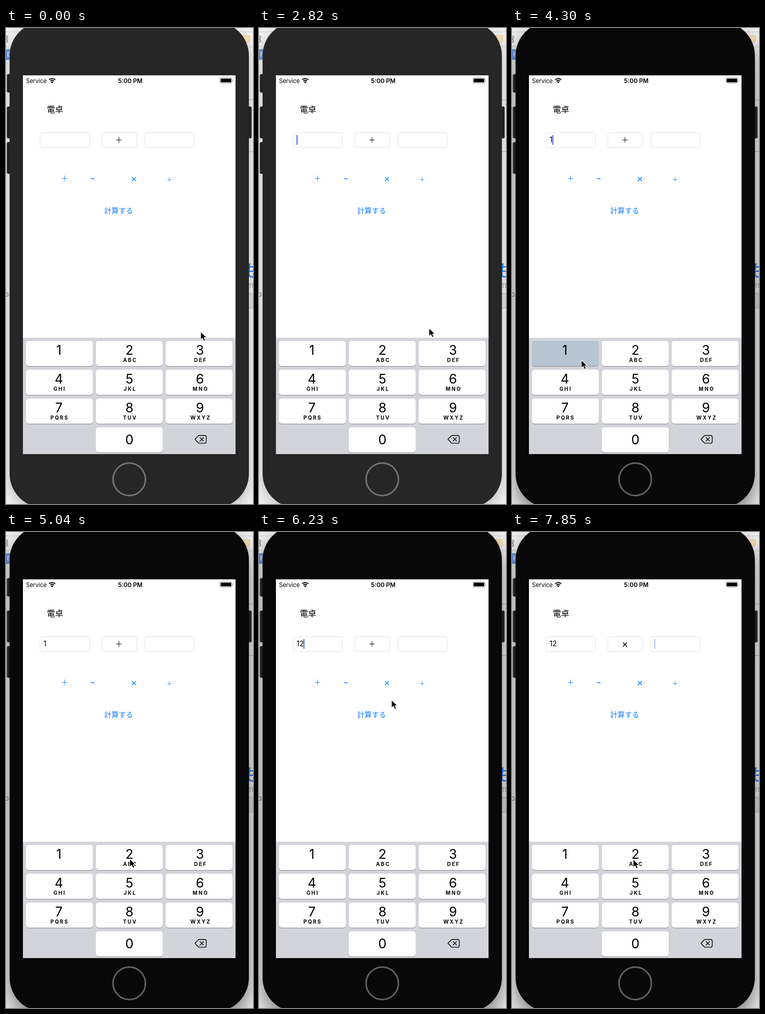
Write an HTML page that moves like this. It is 481 by 925 pixels and loops after 8 s.

```html
<!DOCTYPE html>
<html lang="ja">
<head>
<meta charset="utf-8">
<title>電卓</title>
<style>
  html, body { margin: 0; width: 100%; height: 100%; overflow: hidden; background: #f0f0f0; }
  svg { display: block; font-family: Inter, "Noto Sans CJK JP", "Noto Sans CJK", sans-serif; }
  .cjk { font-family: "Noto Sans CJK JP", "Noto Sans CJK", sans-serif; }
  .mid { text-anchor: middle; }
  .field { fill: #fff; stroke: #e6e6e6; }
  .blue { fill: #127eff; }
  .letters { font-size: 10px; font-weight: 700; letter-spacing: 2.1px; }
  .line { fill: none; stroke: #000; stroke-width: 1.4; stroke-linejoin: round; stroke-linecap: round; }

  #shadow { filter: blur(14px); opacity: .22; }
  .shell { fill: #262626; }
  .side { fill: #202020; stroke: #343434; }
  #home { fill: none; stroke: #747474; stroke-width: 3; }
  .active #shadow { filter: blur(20px); opacity: .5; transform: translateY(9px); }
  .active .shell { fill: #080808; }
  .active .side { fill: #1e1e1e; stroke: #3a3a3a; }
  .active #home { stroke: #626262; }
</style>
</head>
<body>
<svg id="stage" width="481" height="925" viewBox="0 0 481 925">
  <!-- window behind the phone -->
  <rect width="481" height="925" fill="#f0f0f0"/>
  <rect y="7" width="481" height="1" fill="#c9c9c9"/>
  <rect y="36" width="481" height="1" fill="#cfcfcf"/>
  <path d="M-3 16h6v4h-6zM-3 23h6v4h-6zM0 20v3" fill="none" stroke="#808080" stroke-width="1.3"/>
  <rect x="461" y="15" width="13" height="12" rx="2" fill="#f8e3b8" stroke="#efc36c"/>
  <rect y="41" width="20" height="21" fill="#6d9ae0"/>
  <text x="2" y="55" font-size="11" fill="#fff">E</text>
  <text x="-3" y="522" font-size="14" fill="#777">p</text>
  <path d="M440 139.5h41M440 240.5h41" stroke="#a9a6ee"/>
  <text class="cjk blue" x="462" y="483" font-size="32">も</text>
  <text x="472" y="505" font-size="12" fill="#999">11</text>
  <path d="M440 516h41v28h-41z" fill="#e2e2e2" stroke="#b5b5b5"/>

  <!-- phone -->
  <rect id="shadow" x="7" y="0" width="466" height="940" rx="66"/>
  <g class="side">
    <rect x="2" y="90" width="9" height="35" rx="2"/>
    <rect x="2" y="153" width="9" height="61" rx="2"/>
    <rect x="2" y="222" width="9" height="61" rx="2"/>
    <rect x="469" y="153" width="9" height="61" rx="2"/>
  </g>
  <rect class="shell" x="7" y="-12" width="466" height="944" rx="66"/>
  <circle id="home" cx="240" cy="877" r="31.5"/>
  <rect x="33" y="92" width="414" height="736" fill="#fff"/>

  <!-- status bar -->
  <text x="39" y="106.5" font-size="11.3">Service</text>
  <path d="M84 100.6a9 9 0 0 1 12 0M86.4 103.2a5.4 5.4 0 0 1 7.2 0" fill="none" stroke="#000" stroke-width="2"/>
  <path d="M90 107.6l-2.3-2.5a3.4 3.4 0 0 1 4.6 0z"/>
  <text class="mid" x="242" y="106.7" font-size="11.8" font-weight="600">5:00 PM</text>
  <rect x="416.5" y="97" width="23.5" height="10" rx="2.5" fill="#fff" stroke="#8a8a8a"/>
  <rect x="418" y="98.5" width="20.5" height="7" rx="1"/>
  <path d="M441 100.5q1.5 1.5 0 3.5z" fill="#8a8a8a"/>

  <!-- calculator -->
  <text class="cjk" x="79.5" y="164" font-size="16">電卓</text>
  <rect class="field" x="66.5" y="203.5" width="96" height="29" rx="4"/>
  <rect class="field" x="186.5" y="203.5" width="68" height="29" rx="4"/>
  <rect class="field" x="270.5" y="203.5" width="96" height="29" rx="4"/>
  <text id="entry" x="73" y="222.3" font-size="14"></text>
  <g id="chosen"></g>
  <g id="ops" class="blue"></g>
  <text class="cjk mid blue" x="219.5" y="360.3" font-size="14">計算する</text>
  <rect id="caret" y="208" width="2" height="19" fill="#426bdc"/>

  <!-- keypad -->
  <rect x="33" y="602" width="414" height="226" fill="#d2d4da"/>
  <g id="keys"></g>
  <path class="line" d="M368 799.3l6.3-6.6q1-1 2.6-1h10q3 0 3 3v9.2q0 3-3 3h-10q-1.6 0-2.6-1zM378 796l6.6 6.6m0-6.6l-6.6 6.6"/>

  <path id="pointer" d="M0 0v16l3.7-3.4 2.6 5.6 3-1.3-2.6-5.4h5z" stroke="#fff" stroke-width="1.1" stroke-linejoin="round"/>
</svg>
<script>
const $ = id => document.getElementById(id);
const LOOP = 8000, TICKS = 54, PRESS = 150;

// Operator glyph centred on a point
const op = (sign, x, y) => {
  const size = sign === '×' ? 19 : 14;
  const weight = sign === '−' ? 600 : 400;
  return `<text class="mid" x="${x}" y="${y + size * .365}" font-size="${size}" font-weight="${weight}">${sign}</text>`;
};

$('ops').innerHTML = op('＋', 114, 292) + op('−', 169, 292) + op('×', 249, 292) + op('÷', 318, 293);

const drawKey = (digit, col, row, label) => {
  const x = 39 + 136 * col, y = 608 + 56 * row, mid = 103 + 137.3 * col;
  return `<rect x="${x}" y="${y + 1}" width="130" height="49" rx="5" fill="#898a8e"/>
    <rect id="key${digit}" x="${x}" y="${y}" width="130" height="49" rx="5" fill="#fff"/>
    <text class="mid" x="${mid}" y="${y + (digit ? 26.7 : 33)}" font-size="25.5">${digit}</text>
    <text class="mid letters" x="${mid + 1.5}" y="${y + 41}">${label}</text>`;
};
const letters = ['', 'ABC', 'DEF', 'GHI', 'JKL', 'MNO', 'PQRS', 'TUV', 'WXYZ'];
$('keys').innerHTML = letters.map((s, i) => drawKey(i + 1, i % 3, i / 3 | 0, s)).join('') + drawKey(0, 1, 3, '');

// What each tap leaves behind; times in ms
const START = { time: 0, entry: '', sign: '＋' };
const taps = [
  { time: 820, caret: 73, entry: '', sign: '＋' },
  { time: 4290, caret: 78.5, entry: '1', sign: '＋', key: 1 },
  { time: 5920, caret: 86.5, entry: '12', sign: '＋', key: 2 },
  { time: 6920, caret: 277, entry: '12', sign: '×' }
];
const ACTIVE = taps[1].time;

// Pointer glides: begin, end, destination
const glides = [
  [440, 890, 367, 588],
  [2670, 2815, 331, 583], [2815, 3120, 150, 653],
  [3840, 4145, 135, 645],
  [4400, 5030, 241, 635],
  [6070, 6220, 258, 326], [6220, 6440, 249, 291],
  [7250, 7700, 240, 642], [7700, 7850, 236, 636]
];

const clamp = v => Math.min(1, Math.max(0, v));
const ease = p => p * p * (3 - 2 * p);

function pointerAt(t) {
  let x = 379, y = 590;
  for (const [begin, end, toX, toY] of glides) {
    const p = ease(clamp((t - begin) / (end - begin)));
    x += (toX - x) * p;
    y += (toY - y) * p;
  }
  return [x, y];
}

// The caret blinks once a second and goes out while the next tap is held
function caretAt(t, tap) {
  if (!tap.caret || taps.some(next => t < next.time && t > next.time - PRESS)) return 0;
  const phase = (t - tap.time) % 1000;
  return clamp((680 - phase) / 200) + clamp((phase - 880) / 120);
}

function draw(t) {
  const tap = taps.findLast(k => k.time <= t) || START;
  $('stage').classList.toggle('active', t >= ACTIVE);
  $('pointer').setAttribute('transform', `translate(${pointerAt(t).map(Math.round)})`);
  $('caret').setAttribute('x', tap.caret || 0);
  $('caret').setAttribute('opacity', caretAt(t, tap));
  $('entry').textContent = tap.entry;
  $('chosen').innerHTML = op(tap.sign, 220, 217);
  const down = t < tap.time + PRESS ? tap.key : 0;
  for (const digit of [1, 2]) $('key' + digit).setAttribute('fill', digit === down ? '#b7c4d1' : '#fff');
}

function frame(now) {
  const tick = Math.floor(((now % LOOP) + 5) * TICKS / LOOP) % TICKS;
  draw(tick * LOOP / TICKS);
  requestAnimationFrame(frame);
}
draw(0);
requestAnimationFrame(frame);
</script>
</body>
</html>
```
